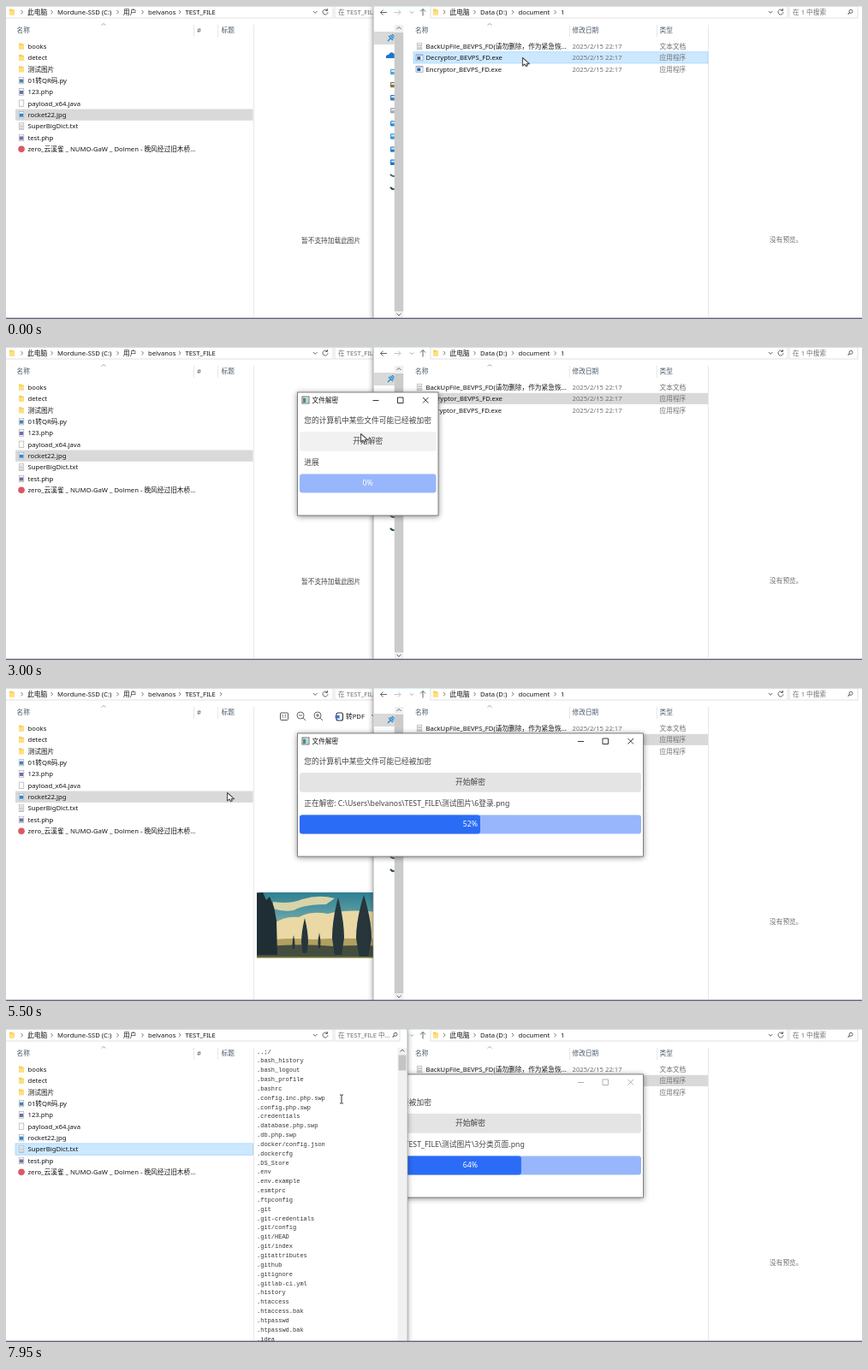
Animation, 1000 px wide and 366 px high, one loop 8000 ms. Source, as an HTML page:

```html
<!DOCTYPE html>
<html>
<head>
<meta charset="utf-8">
<title>文件解密</title>
<style>
html, body { margin: 0; width: 100%; height: 100%; overflow: hidden; background: #fff; }
svg { display: block; width: 1000px; height: 366px; }
text { font: 7.7px "Noto Sans", "Noto Sans CJK SC", "Noto Sans CJK", sans-serif; fill: #151515; white-space: pre; }
.head { fill: #4c5a6d; }
.soft { fill: #707070; }
.big { font-size: 8.75px; fill: #444; }
.code { font: 7px "Liberation Mono", monospace; fill: #333; }
.line { fill: none; stroke: #555; stroke-width: .9; }
.shadow { filter: drop-shadow(0 1px 3px rgba(0,0,0,.45)); }
</style>
</head>
<body>
<svg id="stage" viewBox="0 0 1000 366">
  <g id="layers"><g id="left"></g><g id="right"></g><g id="dialog"></g></g>
  <rect y="364.6" width="1000" height="1.4" fill="#65617a"/>
  <g id="cursor"></g>
</svg>
<script>
const LOOP = 8000;
const LOADED = 5050;
const RAISED = 7100;
const ROW = 13.37;
const LIST_TOP = 40.3;
const USER = 'belvanos';
const $ = id => document.getElementById(id);

// Shape helpers; text is placed by its vertical centre.
const text = (x, y, s, cls = '', extra = '') =>
  `<text x="${x}" y="${y + 2.8}" class="${cls}" ${extra}>${s}</text>`;
const rect = (x, y, w, h, fill, extra = '') =>
  `<rect x="${x}" y="${y}" width="${w}" height="${h}" fill="${fill}" ${extra}/>`;
const path = (d, color = '#555', width = .9) =>
  `<path d="${d}" class="line" style="stroke:${color};stroke-width:${width}"/>`;
const blob = (d, fill) => `<path d="${d}" fill="${fill}"/>`;
const chevron = x => path(`M${x - 1} 5l2 2.2l-2 2.2`, '#666');
const sortMark = x => path(`M${x - 2.5} 22.5l2.5-2l2.5 2`, '#888', .7);
const divider = (x, y = 22, h = 14) => rect(x, y, .8, h, '#e3e3e3');

const folder = (x, y) => blob(`M${x - 3} ${y - 3.5}h3l1 1h2v6h-6z`, '#f8cf58') + rect(x - 3, y - 1.2, 6, 4.7, '#ffdf7f');
const page = (x, y) => rect(x - 2.8, y - 3.8, 5.6, 7.6, '#fafafa', 'stroke="#a5a5a5" stroke-width=".6"');
const badge = color => (x, y) => page(x, y) + rect(x - 2.2, y - 1.5, 4.4, 4, color);
const notes = (x, y) => page(x, y) + [-2, -.5, 1, 2.5].map(d => rect(x - 2, y + d, 4, .6, '#a9a9a9')).join('');
const disc = (x, y) => `<circle cx="${x}" cy="${y}" r="3.8" fill="#dc5863"/>`;
const program = (x, y) =>
  rect(x - 4, y - 3.5, 8, 7, '#fff', 'stroke="#8795a5" stroke-width=".7"') +
  rect(x - 4, y - 3.5, 8, 1.5, '#9fb0c0') + rect(x - 2.7, y - 1.2, 4, 3.6, '#1f5fa8');

const FILES = [
  [folder, 'books'], [folder, 'detect'], [folder, '测试图片'],
  [badge('#4584b8'), '01转QR码.py'], [badge('#6a70ac'), '123.php'], [page, 'payload_x64.java'],
  [badge('#2c86d0'), 'rocket22.jpg'], [notes, 'SuperBigDict.txt'], [badge('#6a70ac'), 'test.php'],
  [disc, 'zero_云溪雀 _ NUMO-GaW _ Dolmen - 晚风经过旧木桥...']
];

const WORDS = ('..;/ .bash_history .bash_logout .bash_profile .bashrc .config.inc.php.swp .config.php.swp ' +
  '.credentials .database.php.swp .db.php.swp .docker/config.json .dockercfg .DS_Store .env .env.example ' +
  '.esmtprc .ftpconfig .git .git-credentials .git/config .git/HEAD .git/index .gitattributes .github ' +
  '.gitignore .gitlab-ci.yml .history .htaccess .htaccess.bak .htpasswd .htpasswd.bak .idea').split(' ');

const magnifier = (x, y, r = 2) =>
  `<circle cx="${x}" cy="${y}" r="${r}" class="line"/>` + path(`M${x - r * .7} ${y + r * .7}l${-r} ${r}`, '#555', 1.1);
const refresh = x => path(`M${x + 2} 4.8a3 3 0 1 0 1 2.4M${x + 2.6} 3v2.4h-2.4`);
const addressBox = (x, w) => rect(x, .5, w, 13.5, '#fff', 'stroke="#d9d9d9" stroke-width=".8"');
const crumbs = list => list.map(([x, s]) => text(x, 7, s) + chevron(x - 6.5)).join('');

function tree(x, base, height, width) {
  const top = base - height, low = base - height * .3;
  return blob(`M${x} ${top}Q${x + width} ${low - height * .3} ${x + width} ${low}L${x + width * .6} ${base}` +
    `H${x - width * .6}L${x - width} ${low}Q${x - width} ${low - height * .3} ${x} ${top}`, '#26363b');
}

function picture() {
  return rect(293, 239, 164, 77, 'url(#sky)') +
    blob('M312 250q20 3 34-3q20-6 38-1l-10 7q-26 0-38 7q-12 2-24-2z', '#d9d3a9') +
    blob('M312 276q14-10 30-8q14-8 34-4q22-7 81 0v30h-145z', '#ead9a4') +
    blob('M293 297q30-6 66-3q40-3 98 1v21h-164z', '#b29f62') +
    blob('M293 303q50-5 90-1q40-3 74 2v12h-164z', '#444e40') +
    blob('M293 240l7-1l4 9l4-4l5 12l3 16l1 40h-24z', '#1f2e34') +
    tree(349, 310, 41, 4) + tree(336, 305, 16, 1.5) + tree(366, 304, 18, 1.5) +
    tree(388, 312, 67, 7) + tree(418, 314, 72, 9) + rect(293, 314.6, 164, 1.4, '#b3a662');
}

function toolbar() {
  const lens = (x, sign) => `<circle cx="${x}" cy="32" r="4" class="line"/>` +
    path(`M${x + 3} 35l3 3M${x - 2} 32h4${sign === '+' ? `M${x} 30v4` : ''}`);
  return rect(320.5, 29, 9, 8.5, 'none', 'stroke="#444" stroke-width=".9" rx="1"') +
    text(325, 32, '1:1', '', 'text-anchor="middle" style="font-size:4.5px"') + lens(344, '-') + lens(364, '+') +
    rect(386, 29, 7.5, 9, 'none', 'stroke="#333" stroke-width="1.1" rx="2"') + rect(384.6, 32, 5, 3.6, '#3477d6') +
    text(397, 33, '转PDF') + path('M427 31l2 2l2-2');
}

function preview(t) {
  if (t < LOADED) return text(345, 274, '暂不支持加载此图片', '', 'style="fill:#444"');
  if (t < RAISED) return toolbar() + picture();
  if (t < 7450) return '';
  return WORDS.map((s, i) => text(293, 25.7 + i * 10.84, s, 'code')).join('') +
    rect(457.5, 22, 11, 342.6, '#f1f1f1') + rect(458.5, 30.5, 9, 18, '#c4c4c4') + path('M460.5 26.5l2.5-2.5l2.5 2.5');
}

function leftWindow(t, pointer) {
  const chosen = t < 6950 ? 6 : 7;
  const hover = t > 6200 && t < 6950 ? Math.floor((pointer.y - LIST_TOP) / ROW) : -1;
  const rows = FILES.map(([icon, name], i) => {
    const y = LIST_TOP + i * ROW;
    let fill = 'none', stroke = 'none';
    if (i === chosen) [fill, stroke] = t < 6950 ? ['#d9d9d9', 'none'] : ['#cce8ff', '#99d1ff'];
    else if (i === hover) fill = '#e5f3ff';
    return rect(11, y, 277.5, ROW, fill, `stroke="${stroke}" stroke-width=".7"`) +
      icon(18, y + 6.7) + text(25.5, y + 6.7, name);
  }).join('');
  return rect(0, 0, 469, 366, '#fff', t >= RAISED ? 'class="shadow"' : '') +
    rect(0, 0, 469, .9, '#cfe9f3') + addressBox(-2, 384) + addressBox(384, 76) + folder(7, 7) +
    crumbs([[25, '此电脑'], [60, 'Mordune-SSD (C:)'], [137, '用户'], [166, USER], [209.5, 'TEST_FILE']]) +
    (t >= LOADED && t < RAISED ? chevron(251) : '') +
    path('M359 6l2.2 2.4l2.2-2.4') + refresh(373) + text(388, 7, '在 TEST_FILE 中...', 'soft') + magnifier(455, 6.3) +
    text(12.5, 28, '名称', 'head') + sortMark(114) + text(223, 28, '#', 'head') + text(251.5, 28, '标题', 'head') +
    divider(219) + divider(247) + divider(289, 22, 342) + rows + preview(t) +
    (t >= RAISED ? rect(468.6, 0, .8, 366, '#aaa') : '');
}

function sidebar() {
  const colors = ['#53a9c9', '#8b6b48', '#3b79b8', '#aaa', '#2588d8', '#3895d6', '#2a79c0', '#1674d1', '#45616e', '#314d55'];
  const icons = colors.map((c, i) => {
    const y = 77 + i * 15.1, thin = i > 7;
    return thin ? path(`M449 ${y - 1}q2 3 5 2`, c, 2) : rect(449, y - 3.2, 6, 6.4, c, 'rx="1"') + rect(450, y - 2, 4, 2, '#d7edfa');
  }).join('');
  return rect(430, 30, 24, 15, '#d9d9d9') +
    path('M446 41l3-3m-2-3l5 5m-3-6l4 4m-2-5l3 3', '#2387d0', 1.4) +
    blob('M444 61q-1-4 3-4q2-5 7-1v5z', '#1677cf') + icons +
    rect(453.8, 22, 10.4, 342.6, '#f0f0f0') + rect(453.8, 31, 10.4, 326, '#cbcbcb') +
    path('M456.5 27l2.5-2.5l2.5 2.5M456.5 359.5l2.5 2.5l2.5-2.5');
}

function rightWindow(t) {
  const active = t < 1000;
  const files = [
    [notes, 'BackUpFile_BEVPS_FD(请勿删除，作为紧急恢...', '文本文档'],
    [program, 'Decryptor_BEVPS_FD.exe', '应用程序'],
    [program, 'Encryptor_BEVPS_FD.exe', '应用程序']
  ];
  const rows = files.map(([icon, name, kind], i) => {
    const y = 47 + i * ROW;
    return icon(483, y) + text(490.5, y, name) + text(661.5, y, '2025/2/15 22:17', 'soft') + text(763.5, y, kind, 'soft');
  }).join('');
  return rect(429, 0, 571, 366, '#fff', 'class="shadow"') + rect(428.7, 0, .8, 366, '#aaa') +
    rect(429, 0, 571, .9, '#cfe9f3') +
    path('M445 7.5h-7.5m3-3l-3 3l3 3') + path('M453.5 7.5h7.5m-3-3l3 3l-3 3', '#bbb') +
    path('M472 6.5l2 2l2-2', '#999') + path('M487 11.5v-8m-3 3l3-3l3 3') +
    addressBox(496, 417) + addressBox(915, 80) + folder(502, 7) +
    crumbs([[518.5, '此电脑'], [554, 'Data (D:)'], [598.5, 'document'], [648, '1']]) +
    path('M891 6l2.2 2.4l2.2-2.4') + refresh(905) + text(919, 7, '在 1 中搜索', 'soft') + magnifier(987, 6.3) + sidebar() +
    text(478, 28, '名称', 'head') + sortMark(565) + text(661.5, 28, '修改日期', 'head') + text(763.5, 28, '类型', 'head') +
    divider(658) + divider(760) + divider(820, 22, 342) +
    rect(476, 53.8, 344, 13.1, active ? '#cce8ff' : '#d9d9d9', `stroke="${active ? '#99d1ff' : 'none'}" stroke-width=".7"`) +
    rows + text(892, 273.5, '没有预览。', 'soft');
}

// Tracks: [time, values...]; "at" holds, "glide" interpolates.
const at = (keys, t) => keys.filter(k => k[0] <= t).pop();
function glide(keys, t) {
  const i = keys.findIndex(k => k[0] > t);
  if (i < 0) return { x: keys.at(-1)[1], y: keys.at(-1)[2] };
  const a = keys[i - 1], b = keys[i], u = (t - a[0]) / (b[0] - a[0]);
  return { x: a[1] + (b[1] - a[1]) * u, y: a[2] + (b[2] - a[2]) * u };
}

const DRAG = [[0, 66, 27], [1700, 66, 27], [2000, 100, 45], [2300, 188, 58.5], [2450, 325, 76], [2550, 346, 70], [2800, 340.5, 53]];
const POINTER = [
  [0, 603, 60], [150, 603, 60], [500, 616, 55], [850, 616, 57], [1250, 390, 62], [1600, 156, 53], [1700, 136, 38],
  [2000, 170, 56], [2300, 258, 69], [2450, 387, 86], [2550, 407, 80], [2800, 401, 65], [3000, 414, 101],
  [3350, 429, 113], [3450, 428, 112], [4600, 428, 112], [4800, 535, 129], [5150, 258, 122],
  [6200, 258, 122], [6450, 153, 113], [6900, 120, 137], [7450, 120, 137], [7900, 392, 77]
];
const PICTURES = '测试图片\\';
const JOB = [
  [0, 164.5, 0, ''],
  [3600, 228, 3, '01转QR码.py'], [3650, 228, 7, '123.php'], [3700, 246.5, 11, 'payload_x64.java'],
  [3800, 246.5, 15, 'rocket22.jpg'], [4000, 266, 18, 'SuperBigDict.txt'], [4200, 266, 26, 'test.php'],
  [4250, 404, 34, 'zero_云溪雀 _ NUMO-GaW _ Dolmen - 晚风经过旧木桥梁.ogg'],
  [4600, 404, 45, PICTURES + '7我的个人主页修改名称页面.png'],
  [5100, 404, 48, PICTURES + '5首页.png'], [5500, 404, 52, PICTURES + '6登录.png'],
  [5900, 404, 56, PICTURES + '屏幕截图 2024-12-25 204708.png'],
  [7150, 404, 60, PICTURES + '1登录页面.png'], [7450, 404, 64, PICTURES + '3分类页面.png']
];

function dialogWindow(t) {
  if (t < 1000) return '';
  const { x, y } = glide(DRAG, t);
  const [, w, percent, file] = at(JOB, t);
  const ink = t < 6950 ? '#222' : '#aaa';
  const mid = 'text-anchor="middle"';
  const label = file ? `正在解密: C:\\Users\\${USER}\\TEST_FILE\\${file}` : '进展';
  const bar = (width, color) => rect(2.5, 95.5, width, 22, color, 'rx="3"');
  return `<g transform="translate(${x} ${y})">` +
    rect(0, 0, w, 144, '#fff', 'class="shadow" stroke="#777" stroke-width=".9"') +
    rect(5.5, 5, 8, 8, '#fff', 'stroke="#444" stroke-width=".8"') + rect(6.5, 6.5, 3.5, 5.5, '#3e8f98') + rect(10, 6.5, 2.5, 5.5, '#b9d7cf') +
    text(17, 9, '文件解密') +
    path(`M${w - 76.5} 9.5h7M${w - 47.5} 6h6.5v6.5h-6.5zM${w - 18} 6l6.5 6.5m0-6.5l-6.5 6.5`, ink) +
    text(7.7, 33, '您的计算机中某些文件可能已经被加密', 'big') +
    rect(2.5, 46, w - 5, 22.7, t < 3600 ? '#f1f1f2' : '#e4e4e5', 'rx="3"') + text(w / 2, 57.5, '开始解密', 'big', mid) +
    text(7.7, 82.5, label, 'big') +
    bar(w - 5, '#97b6fb') + (percent ? bar((w - 5) * percent / 100 + 3.5, '#2b6cf6') : '') +
    text(w / 2, 106.5, percent + '%', 'big', mid + ' style="fill:#fff"') + '</g>';
}

function pointerShape(t, { x, y }) {
  const overText = t >= 7450 && x > 291;
  return `<g transform="translate(${x} ${y})">` + (overText
    ? path('M-2 0h1.5l.5.6l.5-.6h1.5M0 .6v8.8M-2 10h1.5l.5-.6l.5.6h1.5', '#333', 1)
    : '<path d="M.5 .5V10L3 8L4.6 10.6L6.2 9.8L5.2 7.6H8.6Z" fill="#fff" stroke="#555" stroke-width="1.2" stroke-linejoin="round"/>') + '</g>';
}

const shown = {};
function put(id, markup) {
  if (shown[id] !== markup) $(id).innerHTML = shown[id] = markup;
}

let front = null;
function draw() {
  const t = performance.now() % LOOP;
  const pointer = glide(POINTER, t);
  const top = t >= RAISED ? 'left' : 'dialog';
  if (front !== top) {
    const order = top === 'left' ? ['right', 'dialog', 'left'] : ['left', 'right', 'dialog'];
    order.forEach(id => $('layers').append($(id)));
    front = top;
  }
  put('left', leftWindow(t, pointer));
  put('right', rightWindow(t));
  put('dialog', dialogWindow(t));
  put('cursor', pointerShape(t, pointer));
  requestAnimationFrame(draw);
}

$('stage').insertAdjacentHTML('afterbegin',
  '<defs><linearGradient id="sky" x2="0" y2="1"><stop stop-color="#2f7f92"/><stop offset=".35" stop-color="#5fa0a6"/>' +
  '<stop offset=".75" stop-color="#e6d6a2"/></linearGradient></defs>');
draw();
</script>
</body>
</html>
```
